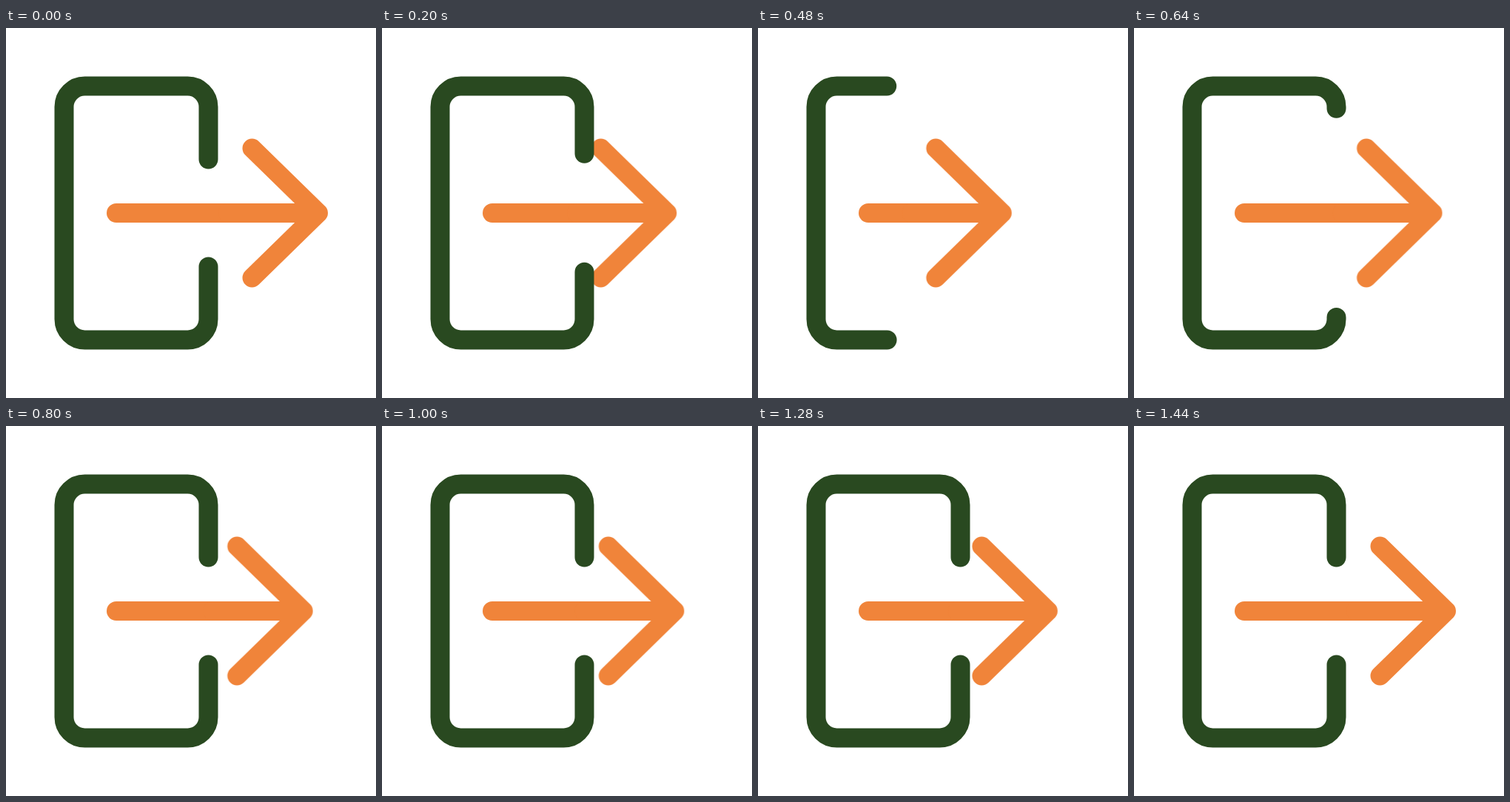
Recreate the animation shown at these times as an HTML page without scripts. Size 500 px wide and 500 px high, loop 2000 ms.

```html
<!DOCTYPE html>
<html lang="en">
<head>
<meta charset="utf-8">
<title>Exit icon</title>
<style>
  html, body { margin: 0; width: 100%; height: 100%; overflow: hidden; background: #fff; }
  svg { display: block; width: 100%; height: 100%; }
  path { fill: none; stroke-width: 26; stroke-linecap: round; stroke-linejoin: round; }

  .arrow { stroke: #f0843a; }
  .door { stroke: #294920; }
  .head, .door {
    animation: slide 2s cubic-bezier(.33, 0, .67, 1) infinite;
  }
  .door { animation-name: trim; }

  /* Three bounces, each one shorter: 1, 1/2 and 1/3 of the first */
  @keyframes slide {
    0%, 35.5%, 55.5%, 71%, 100% { transform: translateX(0); }
    23.4% { transform: translateX(-93px); }
    45.5% { transform: translateX(-47px); }
    63.3% { transform: translateX(-31px); }
  }

  /* The outline is 883 long; both ends retract by 187 */
  @keyframes trim {
    0%, 8.2%, 38%, 100% { stroke-dasharray: 883 2000; stroke-dashoffset: 0; }
    23.5% { stroke-dasharray: 509 2000; stroke-dashoffset: -187px; }
  }
</style>
</head>
<body>
<svg viewBox="0 0 500 500">
  <g class="arrow">
    <path d="M149 250H300"/>
    <path class="head" d="M300 250H422M332.5 162.5L422 250L332.5 337.5"/>
  </g>
  <path class="door" d="M273.5 177.5V106.5A28 28 0 0 0 245.5 78.5H106.5A28 28 0 0 0 78.5 106.5V393.5A28 28 0 0 0 106.5 421.5H245.5A28 28 0 0 0 273.5 393.5V322.5"/>
</svg>
</body>
</html>
```
